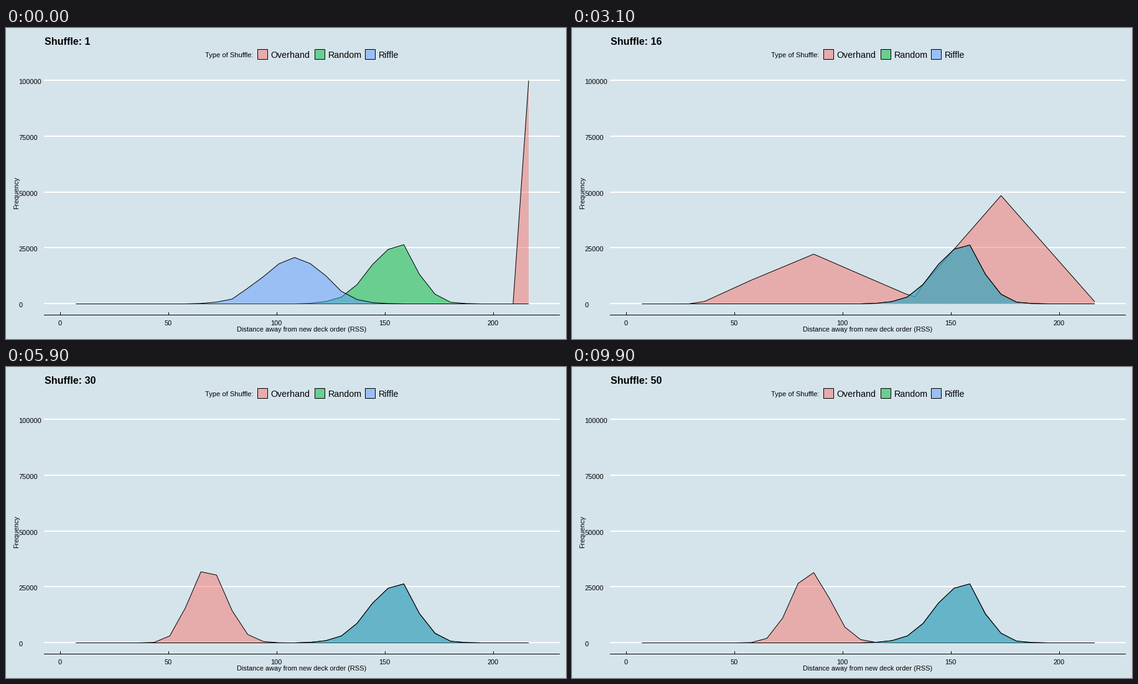
Recreate the animation shown at these times as a matplotlib script. Size 900 px wide and 500 px high, loop 10000 ms.

```python
import math

import matplotlib.pyplot as plt
import numpy as np
from matplotlib.animation import FuncAnimation
from matplotlib.patches import Polygon, Rectangle

W, H, DPI = 900, 500, 100
FRAMES, STATES, DEALS = 100, 50, 100000
BINS, BIN_W = 30, 7.208
MAX_SQ = 46852            # squared distance of a fully reversed deck
BG = "#D5E4EB"
COLORS = {"Overhand": "#F8766D", "Random": "#00BA38", "Riffle": "#619CFF"}
FONT = "Liberation Sans"

centers = BIN_W * np.arange(1, BINS + 1)
edges = BIN_W * (np.arange(BINS + 1) + 0.5)
rng = np.random.default_rng(52)
phi = np.vectorize(lambda z: 0.5 * (1 + math.erf(z / math.sqrt(2))))


def px(x):
    return 87 + 3.48 * np.asarray(x)


def py(count):
    return 443 - 359 * np.asarray(count) / DEALS


# ---- distributions -------------------------------------------------------

def spread(first, values):
    p = np.zeros(BINS)
    p[first - 1:first - 1 + len(values)] = values
    return p / p.sum()


RANDOM = spread(16, [.25, 1.0, 3.1, 8.7, 17.8, 24.5, 26.4, 13.2, 4.3, .75, .15])
RIFFLE_ONCE = spread(9, [.2, .8, 2.1, 7, 12.2, 18, 20.8, 18.4, 12.6, 5.5, 2, .55, .15])
RANDOM_CDF = np.concatenate([[0], np.cumsum(RANDOM)])
RANDOM_MEAN = RANDOM @ centers


def overhand(k):
    """Even counts stay near the new deck, odd counts near its reverse."""
    mean = math.sqrt(MAX_SQ / 2 * (1 - math.exp(-0.0074 * k)))
    sd = np.interp(k, [1, 8, 16, 25, 35, 50], [2.5, 5.4, 6.1, 7.8, 8.6, 8.7])

    def below(d):
        return phi(2 * mean / sd * (np.sqrt(d / mean) - 1))

    if k % 2:
        cdf = 1 - below(np.sqrt(np.maximum(MAX_SQ - edges ** 2, 0)))
    else:
        cdf = below(edges)
    cdf[0], cdf[-1] = 0, 1
    return np.diff(cdf)


def riffle(k):
    if k == 1:
        return RIFFLE_ONCE
    left = 0.5 ** k
    mean = RANDOM_MEAN * math.sqrt(1 - left)
    source = RANDOM_MEAN + (edges - mean) / (1 + 0.5 * left)
    return np.diff(np.interp(source, edges, RANDOM_CDF))


def deal(p):
    p = np.clip(p, 0, None)
    return rng.multinomial(DEALS, p / p.sum())


def refine(counts, n=50):
    """Bring the path to n points by splitting its longest segments."""
    seg = np.hypot(np.diff(centers), np.diff(counts))
    parts = np.ones(BINS - 1, int)
    for _ in range(n - BINS):
        parts[np.argmax(seg / parts)] += 1
    t = np.concatenate([i + np.arange(p) / p for i, p in enumerate(parts)] + [[BINS - 1]])
    i = np.arange(BINS)
    return np.array([np.interp(t, i, centers), np.interp(t, i, counts)])


MODELS = {"Overhand": overhand, "Random": lambda k: RANDOM, "Riffle": riffle}
paths = {name: [refine(deal(model(k))) for k in range(1, STATES + 1)]
         for name, model in MODELS.items()}
keys = np.round(np.arange(STATES) * (FRAMES - 1) / (STATES - 1)).astype(int)


# ---- static stage --------------------------------------------------------

fig = plt.figure(figsize=(W / DPI, H / DPI), dpi=DPI, facecolor=BG)
ax = fig.add_axes([0, 0, 1, 1])
# whole numbers are pixel centres
ax.set_xlim(-0.5, W - 0.5)
ax.set_ylim(H - 0.5, -0.5)
ax.axis("off")


def text(x, y, s, size=11, **kw):
    kw = {"ha": "left", "va": "baseline", **kw}
    return ax.text(x, y, s, fontsize=size * 72 / DPI, family=FONT, color="black", **kw)


def line(xs, ys, color="black", width=1, z=1):
    return ax.plot(xs, ys, color=color, lw=width * 72 / DPI, zorder=z, snap=False,
                   solid_capstyle="butt", solid_joinstyle="miter")[0]


for v in range(0, DEALS + 1, 25000):
    y = round(float(py(v)))
    line([60.5, 889.5], [y - 0.5, y - 0.5], "white", 2)
    text(20, y + 5.7, str(v), zorder=9)

line([60.5, 889.5], [461, 461])
for v in range(0, 201, 50):
    x = round(float(px(v)))
    line([x, x], [456.5, 461.5])
    text(x - 0.8, 477.6, str(v), ha="center")

text(474.5, 487.6, "Distance away from new deck order (RSS)", ha="center")
text(16.5, 264.5, "Frequency", ha="center", va="center", rotation=90, zorder=9)

text(320, 46.6, "Type of Shuffle:", 11.1)
for (name, color), x in zip(COLORS.items(), (404, 496, 577)):
    ax.add_patch(Rectangle((x, 34), 16, 16, fc=color, alpha=0.5, lw=0, snap=False))
    line([x, x + 16, x + 16, x, x], [34, 34, 50, 50, 34])
    text(x + 21.3, 47.6, name, 14.3)

title = text(61.5, 26.6, "", 16, weight="bold")


# ---- moving areas --------------------------------------------------------

areas = {}
for z, (name, color) in enumerate(COLORS.items()):
    fill = Polygon([[0, 0], [1, 0], [1, 1]], fc=color, alpha=0.5, lw=0, zorder=2 + z)
    ax.add_patch(fill)
    areas[name] = fill, line([], [], z=2.5 + z)


def update(frame):
    i = min(np.searchsorted(keys, frame, side="right") - 1, STATES - 2)
    t = (frame - keys[i]) / (keys[i + 1] - keys[i])
    title.set_text(f"Shuffle: {round(1 + (STATES - 1) * frame / (FRAMES - 1))}")
    for name, (fill, edge) in areas.items():
        x, y = (1 - t) * paths[name][i] + t * paths[name][i + 1]
        x, y = px(x), py(y)
        edge.set_data(x, y)
        base = [[x[-1], py(0)], [x[0], py(0)]]
        fill.set_xy(np.vstack([np.column_stack([x, y]), base]))
    return [title]


anim = FuncAnimation(fig, update, frames=FRAMES, interval=100, repeat=True, blit=False)
plt.show()
```
